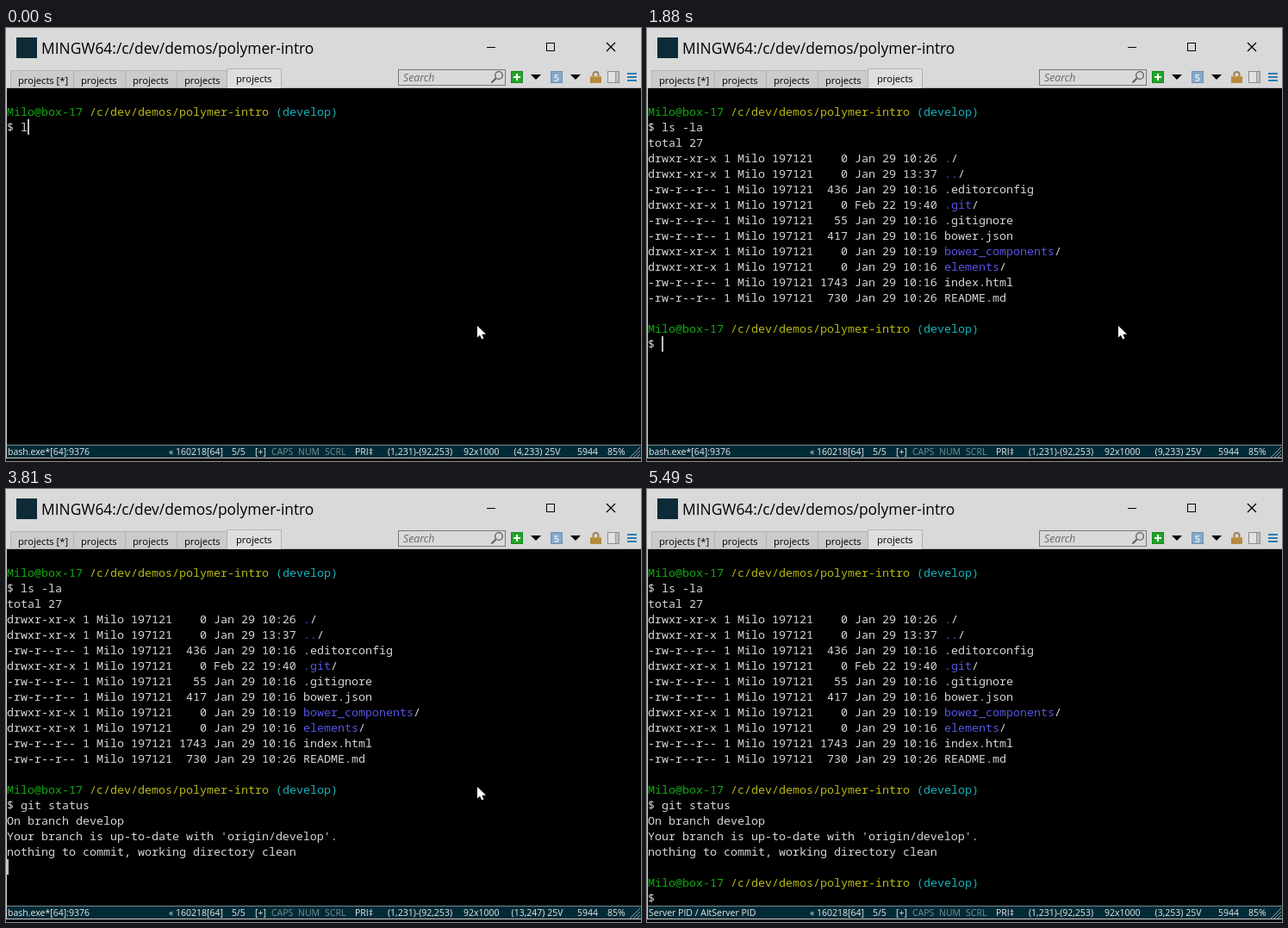
These frames come from a looping animation (737 by 503 pixels, 5800 ms). An HTML page with a canvas:

```html
<!DOCTYPE html>
<html lang="en">
<head>
<meta charset="utf-8">
<title>Terminal session</title>
<style>
  html, body { margin: 0; width: 100%; height: 100%; overflow: hidden; background: #000; }
  canvas { display: block; width: 737px; height: 503px; }
</style>
</head>
<body>
<canvas id="stage" width="737" height="503"></canvas>
<script>
const ctx = document.getElementById('stage').getContext('2d', { alpha: false });

const LOOP = 5800;
const CELL = 8, ROW = 18, LEFT = 1, TOP = 70;
const MONO = '13.333px "Noto Sans Mono", monospace';
const ui = (size, style = '') => `${style} ${size}px "Open Sans", "Noto Sans", sans-serif`;
const C = {
  chrome: '#d9d9d9', tab: '#cbcbcb', edge: '#b4b4b4', text: '#d6d6d6',
  green: '#13a913', yellow: '#b8b814', cyan: '#17b2bb', blue: '#5754e2',
  bar: '#002b36', barText: '#e8e8e8', barDim: '#7a8c90', border: '#d0d0d0'
};
const USER = 'Milo', HOST = 'box-17';

const files = [
  [1, 0, 'Jan 29 10:26', '.'],
  [1, 0, 'Jan 29 13:37', '..'],
  [0, 436, 'Jan 29 10:16', '.editorconfig'],
  [1, 0, 'Feb 22 19:40', '.git'],
  [0, 55, 'Jan 29 10:16', '.gitignore'],
  [0, 417, 'Jan 29 10:16', 'bower.json'],
  [1, 0, 'Jan 29 10:19', 'bower_components'],
  [1, 0, 'Jan 29 10:16', 'elements'],
  [0, 1743, 'Jan 29 10:16', 'index.html'],
  [0, 730, 'Jan 29 10:26', 'README.md']
];

// Each step overrides part of the state; cur is [column, row] of the caret.
const steps = [
  [0, { ls: 'l', git: '', stage: 0, cur: [3, 2], pos: '4,233', mouse: [547, 346], hint: false }],
  [130, { ls: 'ls', cur: [4, 2] }],
  [280, { ls: 'ls ', cur: [5, 2] }],
  [530, { ls: 'ls -', cur: [6, 2] }],
  [840, { ls: 'ls -l', cur: [7, 2], pos: '8,233' }],
  [960, { ls: 'ls -la', cur: [8, 2] }],
  [1510, { cur: null, pos: '9,233' }],
  [1760, { cur: [0, 3] }],
  [1880, { stage: 1, cur: [2, 16] }],
  [2000, { pos: '3,247' }],
  [2430, { cur: null }],
  [2550, { git: 'g', cur: [3, 16], pos: '4,247' }],
  [2670, { git: 'gi', cur: [4, 16] }],
  [2790, { git: 'git', cur: [5, 16] }],
  [2940, { git: 'git s', cur: [7, 16], pos: '8,247' }],
  [3070, { git: 'git st', cur: [8, 16] }],
  [3220, { git: 'git stat', cur: [10, 16] }],
  [3380, { git: 'git statu', cur: [11, 16] }],
  [3530, { git: 'git status', cur: [12, 16], pos: '13,247' }],
  [3810, { stage: 2, cur: [0, 20] }],
  [3960, { stage: 3, cur: [2, 22], pos: '3,253' }],
  [4520, { cur: null }],
  [4950, { cur: [2, 22] }],
  [5100, { mouse: [590, 398] }],
  [5220, { mouse: [638, 456] }],
  [5370, { mouse: [679, 488] }],
  [5490, { mouse: null, hint: true, cur: null }]
];

function stateAt(t) {
  const s = {};
  for (const [at, change] of steps) if (t >= at) Object.assign(s, change);
  return s;
}

function rect(x, y, w, h, color) {
  ctx.fillStyle = color;
  ctx.fillRect(x, y, w, h);
}

function frame(x, y, w, h, color) {
  ctx.strokeStyle = color;
  ctx.lineWidth = 1;
  ctx.strokeRect(x + .5, y + .5, w - 1, h - 1);
}

function path(points, color, width, close) {
  ctx.beginPath();
  points.forEach(([x, y]) => ctx.lineTo(x, y));
  if (close) ctx.closePath();
  if (width) {
    ctx.strokeStyle = color;
    ctx.lineWidth = width;
    ctx.stroke();
  } else {
    ctx.fillStyle = color;
    ctx.fill();
  }
}

function label(str, x, y, font, color, align = 'left') {
  ctx.font = font;
  ctx.fillStyle = color;
  ctx.textAlign = align;
  ctx.fillText(str, x, y);
}

// Writes [text, color] parts one after another on the character grid.
function line(row, ...parts) {
  let col = 0;
  for (const [str, color = C.text] of parts) {
    label(str, LEFT + col * CELL, TOP + row * ROW + 14, MONO, color);
    col += str.length;
  }
}

function prompt(row, cmd) {
  line(row, [`${USER}@${HOST} `, C.green], ['/c/dev/demos/polymer-intro ', C.yellow], ['(develop)', C.cyan]);
  line(row + 1, ['$ ' + cmd]);
}

function drawTitle() {
  rect(0, 0, 737, 70, C.chrome);
  rect(12, 11, 24, 24, '#0d2b36');
  label('MINGW64:/c/dev/demos/polymer-intro', 41, 30, ui(17.4), '#000');
  rect(558, 22, 10, 1, '#000');
  frame(627, 17, 10, 10, '#000');
  path([[697, 17], [707, 27]], '#000', 1.2);
  path([[707, 17], [697, 27]], '#000', 1.2);
}

function drawTabs() {
  const edges = [5, 78, 138, 198, 257];
  edges.slice(0, 4).forEach((x, i) => {
    const w = edges[i + 1] - x;
    rect(x, 49, w, 20, C.tab);
    frame(x, 49, w + 1, 21, C.edge);
    label(i ? 'projects' : 'projects [*]', x + 9, 65, ui(11.2), '#000');
  });
  rect(0, 69, 737, 1, C.edge);
  rect(256, 47, 64, 23, '#dedede');
  path([[256.5, 70], [256.5, 47.5], [319.5, 47.5], [319.5, 70]], C.edge, 1);
  label('projects', 267, 63, ui(11.2), '#000');
}

function drawTools() {
  rect(455, 48, 125, 19, C.chrome);
  frame(455, 48, 125, 19, '#777');
  label('Search', 461, 62, ui(12.3, 'italic'), '#6a6a6a');
  path([[568.5, 58.5], [563.5, 63.5]], '#5c5c5c', 2);
  ctx.beginPath();
  ctx.arc(572, 55, 4.3, 0, Math.PI * 2);
  ctx.lineWidth = 1.3;
  ctx.stroke();

  rect(586, 50, 14, 14, '#23a32b');
  frame(586, 50, 14, 14, '#158a1d');
  rect(592, 53, 2, 8, '#fff');
  rect(589, 56, 8, 2, '#fff');
  for (const x of [609, 655]) path([[x, 54], [x + 12, 54], [x + 6, 60]], '#000');

  rect(632, 50, 14, 14, '#86a8c8');
  frame(632, 50, 14, 14, '#6c91b4');
  label('5', 639, 61.5, ui(11, 'bold'), '#dbe8f3', 'center');

  ctx.beginPath();
  ctx.arc(684.5, 54, 3, Math.PI, 0);
  ctx.lineTo(687.5, 57);
  ctx.moveTo(681.5, 54);
  ctx.lineTo(681.5, 57);
  ctx.strokeStyle = '#9a8458';
  ctx.lineWidth = 2;
  ctx.stroke();
  rect(678, 56, 13, 8, '#c59a4b');
  for (const y of [58, 60, 62]) rect(678, y, 13, 1, '#a67c33');

  rect(698, 50, 14, 14, '#e2e2e2');
  frame(698, 50, 14, 14, '#8d8d8d');
  rect(708, 51, 3, 12, '#bdbdbd');
  rect(707, 51, 1, 12, '#9d9d9d');
  for (const y of [52, 56, 60]) rect(721, y, 11, 2, '#2b7db5');
}

function drawConsole(s) {
  prompt(1, s.ls);
  if (s.stage > 0) {
    line(3, ['total 27']);
    files.forEach(([dir, size, date, name], i) => {
      const mode = dir ? 'drwxr-xr-x' : '-rw-r--r--';
      const info = `${mode} 1 ${USER} 197121 ${String(size).padStart(4)} ${date} `;
      line(4 + i, [info], [name, dir ? C.blue : C.text], [dir ? '/' : '']);
    });
    prompt(15, s.git);
  }
  if (s.stage > 1) {
    line(17, ['On branch develop']);
    line(18, ["Your branch is up-to-date with 'origin/develop'."]);
    line(19, ['nothing to commit, working directory clean']);
  }
  if (s.stage > 2) prompt(21, '');
  if (s.cur) rect(LEFT + s.cur[0] * CELL, TOP + s.cur[1] * ROW, 2, ROW, '#c0c0c0');
}

function drawStatus(s) {
  rect(0, 484, 737, 1, '#75898e');
  rect(0, 485, 737, 14, C.bar);
  const put = (str, x, color = C.barText, align) => label(str, x, 496, ui(10.5), color, align);
  put(s.hint ? 'Server PID / AltServer PID' : 'bash.exe*[64]:9376', 2);
  put('« 160218[64]', 189);
  put('5/5', 262);
  put('[+]', 289);
  put('CAPS', 308, C.barDim);
  put('NUM', 339, C.barDim);
  put('SCRL', 370, C.barDim);
  put('PRI‡', 405);
  put('(1,231)-(92,253)', 443);
  put('92x1000', 531);
  put(`(${s.pos}) 25V`, 616.5, C.barText, 'center');
  put('5944', 663);
  put('85%', 698);
  for (const d of [4, 8, 12]) path([[736 - d, 499], [736, 499 - d]], '#8fa0a4', 1);
}

function drawMouse([x, y]) {
  const shape = [[0, 0], [0, 13.5], [3, 10.8], [5.2, 15.5], [7.4, 14.6], [5.3, 9.8], [10, 9.8]];
  const arrow = shape.map(([dx, dy]) => [x + dx, y + dy]);
  path(arrow, '#000', 2, true);
  path(arrow, '#fff');
}

function render(t) {
  const s = stateAt(t);
  rect(0, 0, 737, 503, '#000');
  drawTitle();
  drawTabs();
  drawTools();
  drawConsole(s);
  drawStatus(s);
  rect(0, 70, 1, 430, C.border);
  rect(0, 499, 737, 1, C.border);
  if (s.mouse) drawMouse(s.mouse);
}

const start = performance.now();
function tick() {
  render((performance.now() - start) % LOOP);
  requestAnimationFrame(tick);
}
tick();
</script>
</body>
</html>
```
